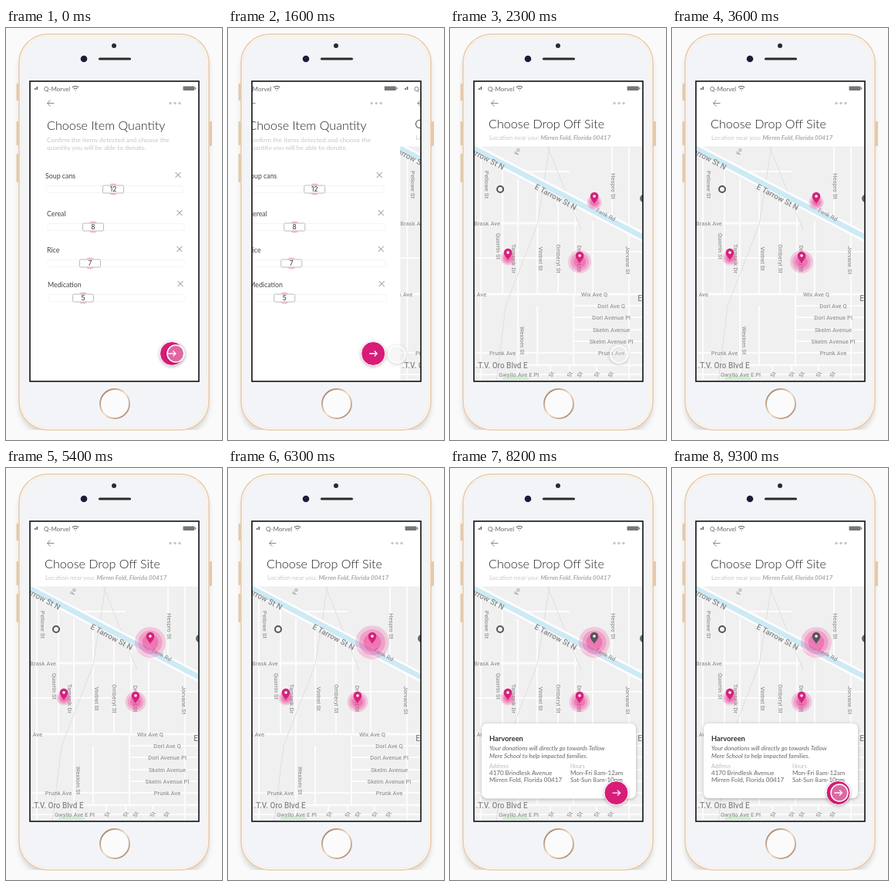
Write an HTML page that moves like this. It is 280 px wide and 534 px high and loops after 9.4 s.

```html
<!DOCTYPE html>
<html lang="en">
<head>
<meta charset="utf-8">
<title>Donation app walkthrough</title>
<style>
  html, body { margin: 0; width: 100%; height: 100%; overflow: hidden; background: #fafafa; }
  svg { display: block; }
  text { font-family: Lato, sans-serif; font-size: 8px; fill: #666; }
  .title { font-size: 16.1px; font-weight: 300; fill: #222; }
  .sub { font-size: 8.4px; fill: #c6c6c6; }
  .item { font-size: 8.8px; fill: #444; }
  .value { font: 8.5px Inter, sans-serif; fill: #333; text-anchor: middle; }
  .street { font: 500 7.6px Roboto, sans-serif; fill: #989898; text-anchor: middle; }
  .big { font-size: 10px; fill: #888; }
  .road { fill: none; stroke: #fcfcfc; }
</style>
</head>
<body>
<svg width="280" height="534" viewBox="0 0 280 534">
  <defs>
    <linearGradient id="gold" x2="1" y2="1">
      <stop stop-color="#8f6a50"/><stop offset=".5" stop-color="#f3dfc8"/><stop offset="1" stop-color="#a07a5c"/>
    </linearGradient>
    <filter id="shadow" x="-30%" y="-30%" width="160%" height="160%">
      <feDropShadow dx="0" dy="1" stdDeviation="2" flood-color="#000" flood-opacity=".3"/>
    </filter>
    <filter id="ground" x="-20%" y="-20%" width="140%" height="140%">
      <feDropShadow dx="0" dy="6" stdDeviation="3" flood-color="#000" flood-opacity=".13"/>
    </filter>
    <g id="header">
      <path d="M37 80v-2h1.5v2zM39.5 80v-4h1.5v4z" fill="#555"/>
      <text x="49" y="81.5">Q-Morvel</text>
      <path d="M86 77q4-3.5 8 0M87.7 79q2.3-2 4.6 0M89.5 81h1" fill="none" stroke="#666" stroke-width="1.2"/>
      <rect x="229.5" y="75.5" width="15" height="5.5" rx="1" fill="#777"/>
      <rect x="245" y="77" width="1.3" height="2.5" fill="#777"/>
      <path d="M62.5 97.5h-9M57.5 93.5l-4 4 4 4" fill="none" stroke="#8a8a8a"/>
      <g fill="#c6c6c6"><circle cx="213" cy="97.5" r="1.7"/><circle cx="219" cy="97.5" r="1.7"/><circle cx="225" cy="97.5" r="1.7"/></g>
    </g>
    <g id="next">
      <circle r="15.5" fill="#d81f78" stroke="#fff" filter="url(#shadow)"/>
      <path d="M-5 0h10M1.5-3.5L5 0 1.5 3.5" fill="none" stroke="#fff" stroke-width="1.3"/>
    </g>
    <g id="halo" fill="#ea3a93">
      <circle r="20" opacity=".22"/><circle r="15.5" opacity=".28"/><circle r="10.5" opacity=".4"/>
    </g>
    <g id="pin">
      <path d="M0 6C-2 2-5.3 0-5.3-4a5.3 5.3 0 0 1 10.600 0C5.300 0 2 2 0 6z"/>
      <circle cy="-4" r="1.8" fill="#fff"/>
    </g>
  </defs>

  <!-- phone -->
  <rect x="17" y="8" width="246" height="513" rx="37" fill="#fff" filter="url(#ground)"/>
  <path d="M0 521h280v13H0z" fill="#fafafa"/>
  <g fill="#e3c9ac">
    <rect x="13.5" y="72" width="4" height="22" rx="1"/><rect x="13.5" y="121" width="4" height="31" rx="1"/>
    <rect x="13.5" y="163" width="4" height="37" rx="1"/><rect x="263" y="121" width="4" height="32" rx="1"/>
  </g>
  <rect x="17" y="8" width="246" height="513" rx="37" fill="#fff" stroke="#e6ccb0" stroke-width="1.6"/>
  <rect x="19.5" y="10.5" width="241" height="508" rx="34.500" fill="#f3f4f8" stroke="#f8efe6" stroke-width="2"/>
  <circle cx="140" cy="23" r="3" fill="#2a2a30"/>
  <circle cx="101" cy="40" r="4.3" fill="#1c1c3a"/>
  <path d="M121.500 40h39" stroke="#2b2b2b" stroke-width="3.200" stroke-linecap="round"/>
  <circle cx="141" cy="487" r="19" fill="#fbfbfc" stroke="url(#gold)" stroke-width="1.900"/>

  <svg x="31" y="69" width="219" height="389" viewBox="31 69 219 389">
    <rect x="31" y="69" width="219" height="389" fill="#fff"/>

    <g id="quantityPage">
      <use href="#header"/>
      <text class="title" x="53" y="131.5">Choose Item Quantity</text>
      <text class="sub" x="53" y="148">Confirm the items detected and choose the</text>
      <text class="sub" x="53" y="158">quantity you will be able to donate.</text>
      <g id="items"></g>
      <use href="#next" x="215" y="422"/>
    </g>

    <g id="mapPage">
      <rect x="31" y="69" width="219" height="389" fill="#fff"/>
      <svg x="31" y="153.5" width="219" height="305" viewBox="31 153.5 219 305">
        <rect x="31" y="153" width="219" height="306" fill="#f0f0f1"/>
        <g class="road" stroke-width="2">
          <path d="M31 253h135M31 345h219M31 437h219" stroke-width="3"/>
          <path d="M40 170v288M68 180v165M88 195v263M113 210v135M140 225v120M162 236v109M185 250v95M232 153v305M210 153v100"/>
          <path d="M160 360h90M160 375h90M160 391h90M160 406h90M31 421h219M31 449h219M113 360v77M160 345v92M31 298h105M95 186h60M163 290h87M130 437v21M155 437v21M190 437v21"/>
        </g>
        <path d="M129 153L113 255 72 360 60 458M126 153L170 262" fill="none" stroke="#dfdfe1"/>
        <path d="M27 154L254 273" stroke="#fff" stroke-width="12"/>
        <path d="M27 154L254 273" stroke="#cdeaf5" stroke-width="7"/>
        <path d="M68 453q16-4 34 0v3H68z" fill="#cdeccf"/>
        <g id="streets"></g>
        <circle cx="65" cy="209" r="4" fill="#f5f5f5" stroke="#555" stroke-width="2"/>
        <circle cx="251" cy="221" r="5" fill="#56706e"/>
        <use href="#halo" id="haloLeft"/><use href="#halo" id="haloMid"/><use href="#halo" id="haloTop"/>
        <g fill="#d4237b">
          <use href="#pin" x="75" y="295"/><use href="#pin" x="168" y="299"/><use href="#pin" id="pinTop" x="187" y="222"/>
        </g>
      </svg>
      <use href="#header"/>
      <text class="title" x="50" y="130">Choose Drop Off Site</text>
      <text x="51" y="144.5" style="fill:#c8c8c8">Location near you: <tspan font-weight="700" font-style="italic" fill="#aaa">Mirren Fold, Florida 00417</tspan></text>
    </g>

    <g id="card">
      <rect x="41" y="331" width="200" height="97" rx="7" fill="#fff" filter="url(#shadow)"/>
      <text x="51" y="354" style="font-size:9.3px;font-weight:700;fill:#333">Harvoreen</text>
      <g font-style="italic">
        <text x="51" y="366">Your donations will directly go towards Tellow</text>
        <text x="51" y="376">Mere School to help impacted families.</text>
      </g>
      <text x="51" y="388.5" style="font-size:7px;fill:#bbb">Address</text>
      <text x="156" y="388.5" style="font-size:7px;fill:#bbb">Hours</text>
      <text x="51" y="397.5">4170 Brindlesk Avenue</text>
      <text x="51" y="406.5">Mirren Fold, Florida 00417</text>
      <text x="156" y="397.5">Mon-Fri 8am-12am</text>
      <text x="156" y="406.5">Sat-Sun 8am-10pm</text>
      <use href="#next" x="215.5" y="421"/>
    </g>

    <g id="cursor">
      <circle r="11" fill="#fff" fill-opacity=".3" stroke="#fff" stroke-width="1.5" filter="url(#shadow)"/>
    </g>
  </svg>
  <rect x="31" y="69" width="219" height="389" fill="none" stroke="#111" stroke-width="1.6"/>
</svg>

<script>
const $ = id => document.getElementById(id);

// label, left edge, label baseline, slider centre, handle centre, value
const items = [
  ['Soup cans', 51, 195, 209, 139, 12],
  ['Cereal', 53, 244, 258, 113, 8],
  ['Rice', 53, 291, 305, 109, 7],
  ['Medication', 54, 336, 350, 100, 5],
];
$('items').innerHTML = items.map(([name, x, y, mid, handle, value]) => `
  <text class="item" x="${x}" y="${y}">${name}</text>
  <path d="M${x + 168.5} ${y - 8}l7 7m0-7l-7 7" stroke="#888"/>
  <rect x="${x + 1}" y="${mid - 4.5}" width="177" height="9" rx="2" fill="#fff" stroke="#f4f4f4"/>
  <rect x="${handle - 4.5}" y="${mid - 7.5}" width="9" height="15" rx="3" fill="#f6bfcd"/>
  <rect x="${handle - 13.5}" y="${mid - 5}" width="27" height="10" rx="1.5" fill="#fff" stroke="#bbb"/>
  <text class="value" x="${handle}" y="${mid + 3}">${value}</text>`).join('');

// name, centre x, centre y, rotation, extra class
const streets = [
  ['Pellowe St', 48, 203, 90], ['Quorrin St', 63, 283, 90], ['Tamselk Dr', 83, 299, 90],
  ['Vintrel St', 118, 299, 90], ['Omberyl St', 141, 299, 90], ['Druskel St', 168, 299, 90],
  ['Hespro St', 212, 205, 90], ['Jorvane St', 231, 301, 90], ['Wexlorn St', 94, 405, 90],
  ['Fo', 87, 160, -75], ['arrow St N', 49, 170, 28, 'big'], ['E Tarrow St N', 137, 219, 28, 'big'],
  ['Fenk Rd', 202, 242, 28], ['Brask Ave', 48, 253], ['ix Ave', 37, 345], ['Wix Ave Q', 187, 345],
  ['Dorl Ave Q', 209, 360], ['Dorl Avenue Pl', 209, 375], ['Skelm Avenue', 209, 391],
  ['Skelm Avenue Pl', 209, 406], ['Prunk Ave', 209, 421], ['Prunk Ave', 68, 421],
  ['.T.V. Oro Blvd E', 67, 437, 0, 'big'], ['Gwyllo Ave E Pl', 89, 449], ['E', 246, 350, 0, 'big'],
  ...[131, 155, 168, 190, 208].map(x => ['St', x, 449, -60]),
];
$('streets').innerHTML = streets.map(([name, x, y, turn = 0, extra = '']) =>
  `<text class="street ${extra}" transform="translate(${x} ${y}) rotate(${turn})" dy=".36em">${name}</text>`).join('');

const ramp = (t, from, to) => Math.min(1, Math.max(0, (t - from) / (to - from)));
const smooth = p => p * p * (3 - 2 * p);
const easeOut = p => 1 - (1 - p) ** 3;
const pulse = (t, from, to) => Math.sin(Math.PI * ramp(t, from, to));
const place = (id, x, y, scale = 1) => $(id).setAttribute('transform', `translate(${x} ${y}) scale(${scale})`);

function cursorAt(t) {
  if (t < 4000) {
    const settle = ramp(t, 0, 300);
    return [220 - settle, 422 + settle, 1 - ramp(t, 2500, 3200)];
  }
  if (t < 8300) return [186, 226, ramp(t, 6700, 7000) * (1 - ramp(t, 7400, 7900))];
  return [217, 421, ramp(t, 8700, 9200)];
}

function draw(t) {
  const slide = 219 * easeOut(ramp(t, 1566, 2366));
  place('quantityPage', -slide, 0);
  place('mapPage', 219 - slide, 0);

  const select = smooth(ramp(t, 3600, 4300));
  place('haloLeft', 75, 298, .48);
  place('haloMid', 168, 303, .75 - .08 * select + .08 * pulse(t, 2500, 3300));
  place('haloTop', 187, 226, .48 + .52 * select
    + .1 * (pulse(t, 4500, 5100) + pulse(t, 5600, 6700) + pulse(t, 8300, 9300)));
  $('pinTop').setAttribute('fill', t < 7700 ? '#d4237b' : '#55565a');

  place('card', 0, 132 * (1 - easeOut(ramp(t, 7350, 8300))));

  const [x, y, alpha] = cursorAt(t);
  place('cursor', x, y, .8 + .2 * alpha);
  $('cursor').setAttribute('opacity', alpha);
}

// The picture advances ten times a second.
function tick() {
  draw(Math.floor(performance.now() % 9400 / 100) * 100);
  requestAnimationFrame(tick);
}
tick();
</script>
</body>
</html>
```
